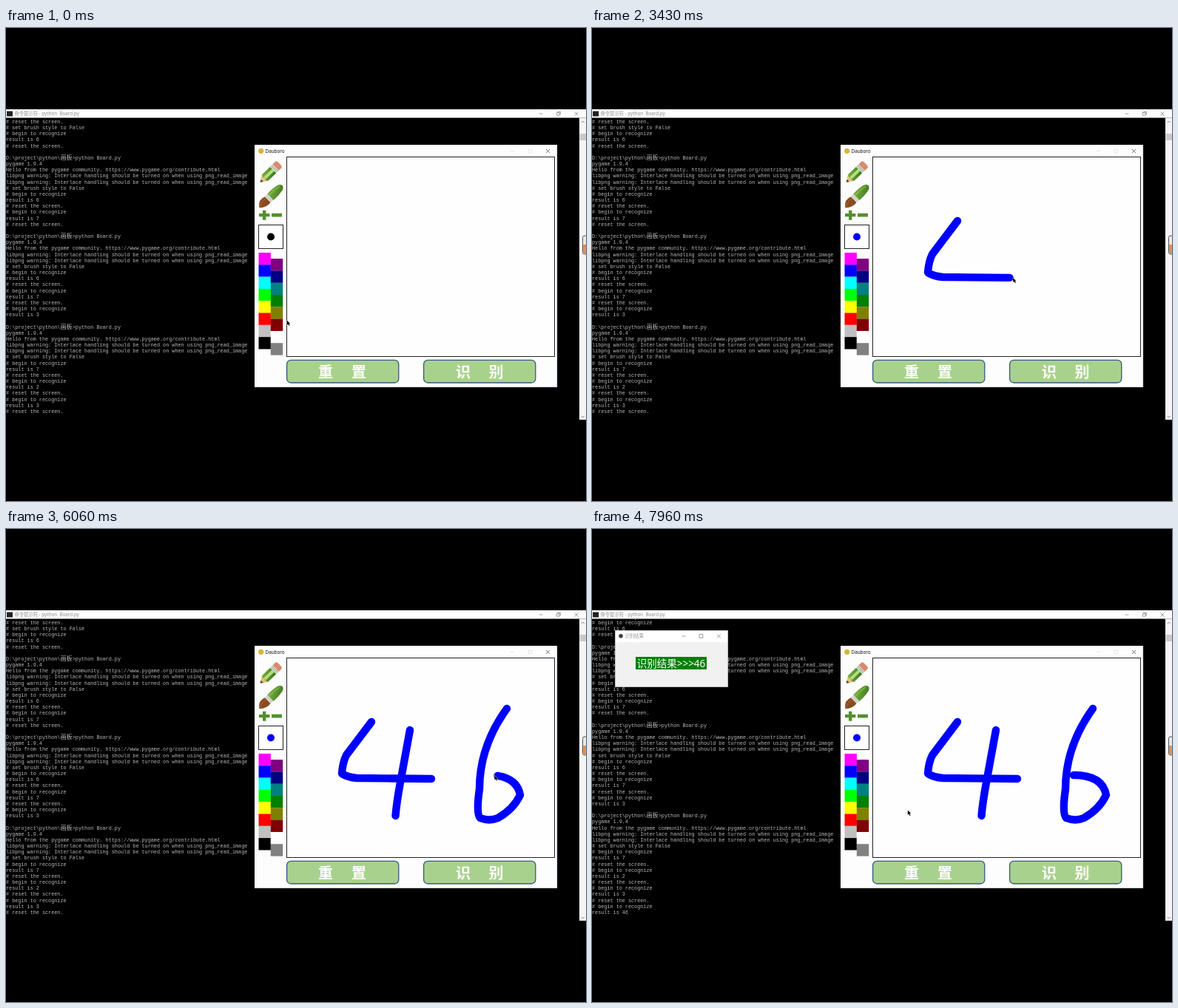
An HTML page for the animation above (8 s loop, 784 by 640 pixels).

```html
<!DOCTYPE html>
<html lang="zh-CN">
<head>
<meta charset="utf-8">
<title>Board</title>
<style>
html, body { margin: 0; width: 100%; height: 100%; overflow: hidden; background: #000; }
svg { display: block; width: 784px; height: 640px; }
text { white-space: pre; font-family: "Noto Sans", "Noto Sans CJK SC", "Noto Sans CJK", sans-serif; }
#rows text { font: 6.81px "Liberation Mono", "Noto Sans CJK SC", "Noto Sans CJK", monospace; fill: #b8b8b8; }
#rows tspan { font-size: 8.17px; }
.ui { font-size: 6.3px; }
.big { font-size: 20px; font-weight: 700; fill: #fff; text-anchor: middle; }
.line { fill: none; stroke-width: .7; }
#ink path { fill: none; stroke-width: 10.4; stroke-linecap: round; stroke-linejoin: round; }
</style>
</head>
<body>
<svg viewBox="0 0 784 640" xmlns="http://www.w3.org/2000/svg">
  <defs>
    <clipPath id="view"><rect y="121.5" width="775" height="402"/></clipPath>
    <linearGradient id="green" x1="0" y1="0" x2="1" y2="1">
      <stop offset="0" stop-color="#7db342"/><stop offset="1" stop-color="#397519"/>
    </linearGradient>
  </defs>
  <rect width="784" height="640"/>

  <g id="console">
    <g clip-path="url(#view)"><g id="rows"></g></g>
    <rect y="110" width="784" height="11.5" fill="#fefefe"/>
    <rect x="1" y="112.5" width="8" height="7" fill="#222"/>
    <text class="ui" x="11.5" y="118.4" fill="#8c8c8c">命令提示符 - python  Board.py</text>
    <path class="line" stroke="#777" d="M720.5 116h5M744.5 114.5h3.6v3.6h-3.6zM745.8 114.5v-1.3h3.6v3.6h-1.3M768.5 113.5l5 5m0-5l-5 5"/>
    <rect x="775" y="121.5" width="9" height="408.5" fill="#f5f5f5"/>
    <rect x="775.5" y="143" width="8.5" height="9" fill="#c9c9c9"/>
    <path class="line" stroke="#555" d="M777.7 128l2-2 2 2M777.7 525l2 2 2-2"/>
    <rect x="779.5" y="281" width="7" height="25" rx="2.5" fill="#e8e8e8" stroke="#555"/>
    <path d="M780.2 293h4v12h-2.5q-1.5 0-1.5-2z" fill="#dc8f58"/>
  </g>

  <g id="board">
    <rect x="336" y="158" width="409" height="328" fill="#fdfdfd"/>
    <path class="line" stroke="#b9cbdc" d="M744.7 158v327.7H336"/>
    <circle cx="344.7" cy="166.3" r="3.6" fill="#d9b437"/>
    <text class="ui" x="350.6" y="168.7" fill="#111">Dauboro</text>
    <path class="line" stroke="#ddd" d="M682 166.5h5M706 164.2h4.6v4.6h-4.6z"/>
    <path class="line" stroke="#333" d="M730 164l5 5m0-5l-5 5"/>
    <rect x="379.5" y="174.5" width="362" height="270" fill="#fefefe" stroke="#222"/>

    <g id="pencil" transform="translate(343.7 208.8) rotate(-44) scale(.97 1.25)">
      <path d="M0 0L9-4.8V4.8z" fill="#e8bf7c"/>
      <path d="M0 0L3.6-1.9V1.9z" fill="#35502a"/>
      <path d="M9-4.8h16v9.6H9l-1.2-2.4L9 0 7.8-2.4z" fill="url(#green)"/>
      <path d="M9-1.6h16v3.2H9z" fill="#b5dc7c"/>
      <path d="M25-4.8h5v9.6h-5z" fill="#d9ddd3"/>
      <path d="M26.7-4.8v9.6M28.5-4.8v9.6" class="line" stroke="#8f9b86"/>
      <path d="M30-4.8h4.5q3 0 3 3v3.6q0 3-3 3H30z" fill="#d98a6c"/>
    </g>
    <g id="brush" transform="translate(342.3 243.2) rotate(-44) scale(1 1.2)">
      <path d="M0 0Q7-8 16-4.5V4.5Q8 6 0 0z" fill="#8a4b20"/>
      <path d="M2 0Q9-4 16-2" class="line" stroke="#b06c3a"/>
      <path d="M16-4.3l5-.7v10l-5-.7z" fill="#cfd3cb"/>
      <path d="M21-5Q32-5.5 40-3.6 43.5-2 43.5 0T40 3.6Q32 5.5 21 5z" fill="url(#green)"/>
      <path d="M22-2.4Q32-3 40-1.5" stroke="#8fc05c" fill="none"/>
    </g>
    <path d="M347 246.7h4.4v4.4h5v4.2h-5v4.5H347v-4.5h-5v-4.2h5zM359 250.8h14v4.6h-14z" fill="#55902f"/>
    <rect x="341.5" y="266.5" width="33" height="32" fill="#fff" stroke="#222"/>
    <circle id="dot" cx="358" cy="282.5" r="5"/>
    <g id="palette"></g>

    <g fill="#a9d18e" stroke="#36597f" stroke-width="1.3">
      <rect x="379.6" y="449.4" width="151.2" height="30.6" rx="5.5"/>
      <rect x="564.6" y="449.4" width="151.2" height="30.6" rx="5.5"/>
    </g>
    <g class="big">
      <text x="432" y="472.6">重</text><text x="477" y="472.6">置</text>
      <text x="618" y="472.6">识</text><text x="662.5" y="472.6">别</text>
    </g>
    <g id="ink"></g>
  </g>

  <g id="dialog">
    <rect x="31" y="137" width="153" height="77" fill="#f1f1f1"/>
    <rect x="31" y="137" width="153" height="16" fill="#fff"/>
    <rect x="31.3" y="137.3" width="152.4" height="76.4" class="line" stroke="#aaa"/>
    <circle cx="39" cy="144.7" r="2.8" fill="#3a4148"/>
    <text class="ui" x="44.5" y="147.2" fill="#999">识别结果</text>
    <path class="line" stroke="#777" d="M121.5 145h5M145 142.5h4.8v4.8H145zM169 142.5l5 5m0-5l-5 5"/>
    <rect x="59" y="173" width="96" height="17" fill="#008000"/>
    <text x="107" y="186.6" font-size="13.5" fill="#fff" text-anchor="middle">识别结果&gt;&gt;&gt;46</text>
  </g>

  <path id="cursor" d="M0 0V6.2L1.5 4.9 2.6 7.3 3.6 6.8 2.6 4.5H4.4z" fill="#000" stroke="#fff" stroke-width=".7" paint-order="stroke"/>
</svg>
<script>
const LOOP = 8000, LAG = 50, ROW = 8.167, CELL = 16.3;
const PICK = 800, CLICK = 7150, RESULT = 7480, POPUP = 7560;
const $ = id => document.getElementById(id);
const add = (parent, tag, attrs) => {
  const el = document.createElementNS("http://www.w3.org/2000/svg", tag);
  for (const k in attrs) el.setAttribute(k, attrs[k]);
  return parent.appendChild(el);
};

// Console text
const reset = "# reset the screen.", brush = "# set brush style to False", begin = "# begin to recognize";
const warn = "libpng warning: Interlace handling should be turned on when using png_read_image";
const result = n => [begin, "result is " + n];
const run = (...digits) => [
  "", "D:\\project\\python\\<tspan>画板</tspan>&gt;python Board.py", "pygame 1.9.4",
  "Hello from the pygame community. https://www.pygame.org/contribute.html",
  warn, warn, brush,
  ...digits.flatMap((d, i) => i ? [reset, ...result(d)] : result(d))
];
const rows = [
  reset, brush, ...result(6), reset,
  ...run(6, 7), reset, ...run(6, 7, 3), ...run(7, 2, 3), reset, ...result(46)
];
rows.forEach((s, i) => { add($("rows"), "text", { x: 0, y: 128.9 + i * ROW }).innerHTML = s; });

// Bright colours on the left, their dark versions half a cell lower on the right
const bright = ["magenta", "blue", "cyan", "lime", "yellow", "red", "silver", "black"];
const dark = ["purple", "navy", "teal", "green", "olive", "maroon", "white", "gray"];
[bright, dark].forEach((names, c) => names.forEach((fill, i) => add($("palette"), "rect", {
  x: 341.5 + c * CELL, y: 304 + (i + c / 2) * CELL, width: CELL + .1, height: CELL + .1, fill
})));

// Mouse travel: each leg follows a path and slows towards its end
const easeOut = p => 1 - (1 - p) ** 2;
const leg = (from, to, d, pen) => {
  const path = add($("ink"), "path", { d, stroke: pen ? "#00f" : "none" });
  const size = path.getTotalLength();
  const reach = t => size * easeOut(Math.min(1, Math.max(0, (t - from) / (to - from))));
  return { from, path, pen, size, reach };
};
const move = (from, to, d) => leg(from, to, d, false);
const stroke = (from, to, d) => leg(from, to, d, true);

const legs = [
  move(0, 600, "M380 396L350 329"),
  move(1220, 1750, "M350 329Q425 330 506 275"),
  move(1750, 2450, "M506 275L513 250"),
  move(2500, 2680, "M513 250L494 261"),
  stroke(2700, 3580, "M494 261L460 306Q455 316 454 331Q462 336 474 337L575 338"),
  move(3600, 3860, "M575 338Q575 250 546 272"),
  stroke(3880, 4330, "M546 272L533 343Q528 370 526.5 388"),
  move(4350, 4940, "M526.5 388Q630 190 677 243"),
  stroke(4990, 6300, "M677 243Q640 294 640 352Q635 386 641 391Q653 396 665 391Q686 379 695 360Q690 333 651 333"),
  move(6600, 7090, "M651 333Q654 400 648 464"),
  move(7600, 8120, "M648 464L404 372")
];

function draw(t) {
  const now = legs.filter(l => l.from <= t).pop();
  const { x, y } = now.path.getPointAtLength(now.reach(t));
  $("cursor").setAttribute("transform", `translate(${x} ${y})`);

  for (const { from, path, pen, size, reach } of legs) {
    if (!pen) continue;
    path.setAttribute("visibility", t - LAG >= from ? "visible" : "hidden");
    path.setAttribute("stroke-dasharray", `${reach(t - LAG) + .01} ${size * 2}`);
  }

  $("dot").setAttribute("fill", t < PICK ? "#000" : "#00f");
  const scrolled = (t >= CLICK) + (t >= RESULT);
  $("rows").setAttribute("transform", `translate(0 ${-scrolled * ROW})`);
  $("dialog").setAttribute("visibility", t >= POPUP ? "visible" : "hidden");
}

function tick() {
  draw(performance.now() % LOOP);
  requestAnimationFrame(tick);
}
tick();
</script>
</body>
</html>
```
